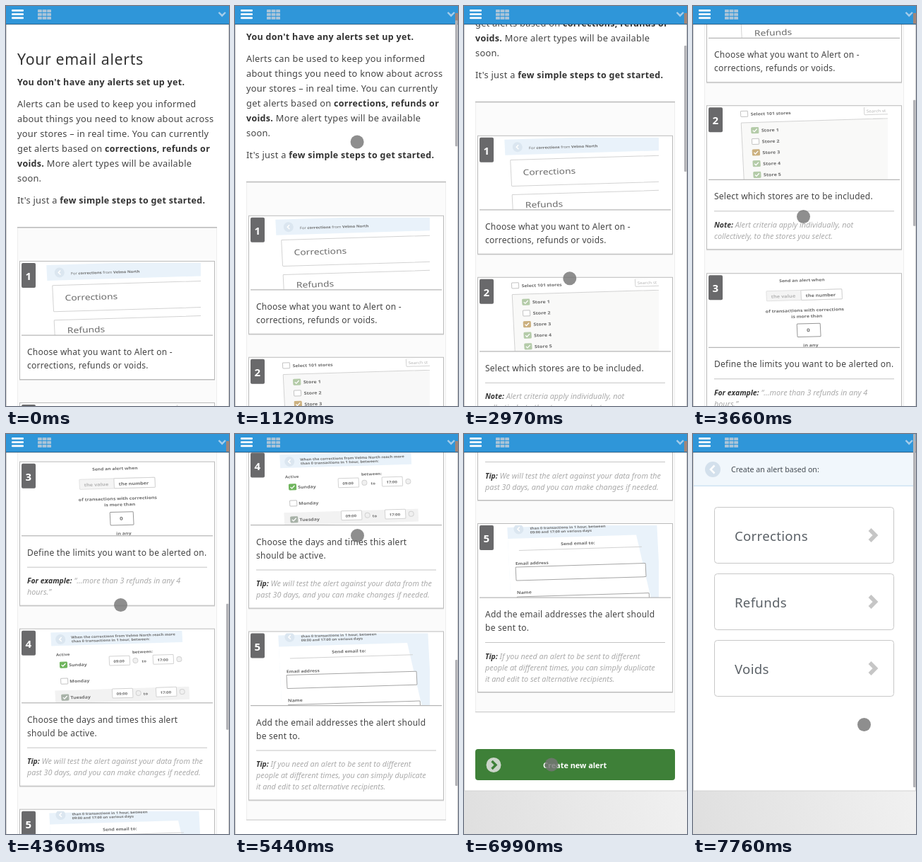
Write an HTML page that moves like this. It is 316 px wide and 565 px high and loops after 8 s.

```html
<!DOCTYPE html>
<html lang="en">
<head>
<meta charset="utf-8">
<title>Email alerts</title>
<style>
html, body { margin: 0; width: 100%; height: 100%; overflow: hidden; background: #eee; }
svg { display: block; width: 100%; height: 100%; }
text { font-family: "Noto Sans", "Open Sans", sans-serif; font-size: 12.8px; letter-spacing: .27px; fill: #444; }
.h1 { font-size: 21.4px; letter-spacing: .6px; fill: #333; }
.b { font-weight: 700; font-size: 12.5px; letter-spacing: .3px; fill: #333; }
.body { font-size: 12px; letter-spacing: .25px; }
.note { font-size: 10.8px; letter-spacing: 0; font-style: italic; fill: #aaa; }
.note .b { font-size: 10.4px; letter-spacing: 0; }
.num { font-size: 15px; font-weight: 600; fill: #fff; text-anchor: middle; }
.button { font-size: 10.9px; letter-spacing: 0; font-weight: 700; fill: #fff; }
.option { font-size: 18.6px; letter-spacing: .3px; fill: #5b6167; }
.sub { font-size: 10.6px; letter-spacing: 0; fill: #444b52; }
.shot { opacity: .87; }
.shot text { letter-spacing: 0; font-weight: 700; fill: #555; }
.shot .plain { font-weight: 400; }
.shot .pale { fill: #aaa; }
.shot .strong { font-weight: 700; }
</style>
</head>
<body>
<svg id="stage" viewBox="0 0 316 565" preserveAspectRatio="none"></svg>
<script>
const text = (x, y, cls, str) => `<text x="${x}" y="${y}" class="${cls}">${str}</text>`;
const rect = (x, y, w, h, fill, extra = '') =>
  `<rect x="${x}" y="${y}" width="${w}" height="${h}" fill="${fill}" ${extra}/>`;
const circle = (x, y, r, fill) => `<circle cx="${x}" cy="${y}" r="${r}" fill="${fill}"/>`;
const path = (d, stroke, width = 1) => `<path d="${d}" fill="none" stroke="${stroke}" stroke-width="${width}"/>`;
const chevron = (x, y, size, stroke, width) =>
  path(`M${x} ${y - Math.abs(size)}l${size} ${Math.abs(size)} ${-size} ${Math.abs(size)}`, stroke, width);
const bold = str => `<tspan class="b">${str}</tspan>`;

// Pieces of the tilted pictures
const box = (x, y, w, h, fill = '#fff', stroke = '#ccc') => rect(x, y, w, h, fill, `rx="1" stroke="${stroke}"`);
const flat = (x, y, size, str, cls = '') =>
  `<text transform="translate(${x} ${y}) scale(1 .82)" class="${cls}" style="font-size:${size}px">${str}</text>`;
const strong = str => `<tspan class="strong">${str}</tspan>`;
const band = (x, w, h) => rect(x, 5, w, h, '#e6f1fa');
const back = (x, y) => circle(x, y, 7, '#d6e3ee') + chevron(x + 1.5, y, -3, '#fff', 1.5);
const tick = (x, y, fill) => box(x - 5, y - 4, 10, 8, fill, fill === '#fff' ? '#bbb' : fill) +
  path(`M${x - 3} ${y}l2 2 4-4`, '#fff', 1.3);
const timeBox = (x, y, time) => box(x, y - 7, 29, 13) + flat(x + 6, y + 2, 6, time) +
  `<circle cx="${x + 37}" cy="${y}" r="3.5" fill="#eee" stroke="#ccc"/>`;

const storeColor = n => n === 2 ? '#fff' : n === 3 ? '#c4a56d' : '#a9c49c';
const storeRow = n => {
  const y = 19.5 + 15.7 * n;
  return tick(29, y, storeColor(n)) + flat(38, y + 2.5, 7.2, 'Store ' + n);
};
const dayRow = (day, i) => {
  const y = 51 + 23 * i, open = day !== 'Monday';
  return (i === 2 ? rect(8, y - 10, 190, 18, '#f0f0f0') : '') +
    tick(22, y, ['#5aaa45', '#fff', '#9ba79b'][i]) + flat(29.5, y + 2.5, 7, day) +
    (open ? timeBox(87 + i, y - 3, '09:00') + flat(133, y, 6, 'to') + timeBox(149 + i, y - 3, '17:00') : '');
};

const shots = [
  band(0, 222, 22) + back(18, 16) +
    flat(34, 19.5, 5.9, `For ${strong('corrections')} from ${strong('Velmo North')}`, 'plain') +
    box(7, 34, 240, 37) + flat(24, 56, 13.8, 'Corrections', 'plain') +
    box(7, 83, 240, 37) + flat(25, 102, 13.8, 'Refunds', 'plain'),

  tick(15, 11.5, '#fff') + flat(24, 14.2, 6.9, 'Select 101 stores') +
    box(185, 7, 60, 11) + flat(188, 15, 6.5, 'Search st', 'pale plain') +
    box(10, 24, 250, 100, '#f8f8f7') + [1, 2, 3, 4, 5].map(storeRow).join(''),

  flat(64.5, 14, 6.7, 'Send an alert when') +
    box(45.5, 26, 107, 14, '#f3f3f3', '#ddd') + box(94.5, 26, 58, 14) +
    flat(52, 36, 7.4, 'the value', 'pale') + flat(101, 36, 7.2, 'the number') +
    flat(43, 56.5, 7, 'of transactions with corrections') + flat(79, 65, 7, 'is more than') +
    box(86.5, 73.5, 33, 18.5, '#fff', '#888') + flat(100, 85, 8, '0') + flat(94, 106, 7, 'in any'),

  band(6, 186, 19) + back(19.5, 15) +
    flat(34.5, 14.2, 5.7, 'When the corrections from Velmo North reach more') +
    flat(35, 19.8, 5.7, 'than 0 transactions in 1 hour, between:') +
    flat(12, 38.4, 6.3, 'Active') + flat(120, 37.8, 6.3, 'between:') +
    ['Sunday', 'Monday', 'Tuesday'].map(dayRow).join(''),

  band(4, 212, 110) + '<path d="M4 21h182l17 94H4z" fill="#fff"/>' + back(20, 8) +
    flat(36, 9, 5.6, 'than 0 transactions in 1 hour, between') +
    flat(36, 14.6, 5.6, '09:00 and 17:00 on various days') +
    flat(78.5, 32.5, 6.9, 'Send email to:') + path('M19 38h174', '#ccc') +
    flat(13, 58.5, 6.8, 'Email address') + box(13, 61.5, 184, 19, '#fff', '#999') +
    flat(13, 99.5, 7, 'Name') + box(13, 103.5, 187, 19, '#fff', '#999')
];

const cards = [
  { lines: ['Choose what you want to Alert on -', 'corrections, refunds or voids.'] },
  { lines: ['Select which stores are to be included.'], label: 'Note:',
    notes: ['Alert criteria apply individually, not', 'collectively, to the stores you select.'] },
  { lines: ['Define the limits you want to be alerted on.'], label: 'For example:',
    notes: ['“…more than 3 refunds in any 4', 'hours.”'] },
  { lines: ['Choose the days and times this alert', 'should be active.'], label: 'Tip:',
    notes: ['We will test the alert against your data from the', 'past 30 days, and you can make changes if needed.'] },
  { lines: ['Add the email addresses the alert should', 'be sent to.'], label: 'Tip:',
    notes: ['If you need an alert to be sent to different', 'people at different times, you can simply duplicate',
      'it and edit to set alternative recipients.'] }
];

// Cards stack downwards, each as tall as its text
let cardTop = 361;
function drawCard({ lines, label, notes = [] }, i) {
  const rule = 129 + 19 * lines.length;
  const height = rule + (label ? 23 + 16 * notes.length : 0);
  const top = Math.round(cardTop);
  cardTop += height + 33.25;
  return `<g transform="translate(0 ${top})">` +
    rect(19, 1, 277, height, '#ddd') + rect(19.5, -.5, 276, height, '#fff', 'stroke="#bbb"') +
    `<g class="shot" clip-path="url(#shotClip)"><g transform="matrix(1 -.03 .05 1 57 0)">${shots[i]}</g></g>` +
    rect(22, 103.5, 271, 1.2, '#b4b4b4') +
    rect(22, 2, 20, 35, '#69696b', 'rx="2"') + text(32, 26, 'num', i + 1) +
    lines.map((line, n) => text(30, 132 + 19 * n, 'body', line)).join('') +
    (label ? rect(30, rule, 255, 1, '#c4c4c4') : '') +
    notes.map((line, n) => text(30, rule + 23.5 + 16 * n, 'note', (n ? '' : bold(label) + ' ') + line)).join('') +
    '</g>';
}

const intro = [
  'Alerts can be used to keep you informed',
  'about things you need to know about across',
  'your stores – in real time. You can currently',
  'get alerts based on ' + bold('corrections, refunds or'),
  bold('voids.') + ' More alert types will be available',
  'soon.'
];

const sheet = bottom => rect(.5, -20, 315, bottom + 20, '#fff', 'stroke="#d2d2d2"');

const alertsPage = sheet(1666) +
  text(16, 82.5, 'h1', 'Your email alerts') +
  text(16, 112, 'b', "You don't have any alerts set up yet.") +
  intro.map((line, i) => text(16, 143 + 21 * i, '', line)).join('') +
  text(16, 279, '', "It's just a " + bold('few simple steps to get started.')) +
  rect(16.5, 313, 282, 1242, '#fbfbfb', 'stroke="#eee"') +
  rect(16, 312, 283, 1.5, '#bbb') + rect(16, 1554, 283, 1, '#ccc') +
  cards.map(drawCard).join('') +
  rect(16, 1607, 283, 44, '#3e8038', 'rx="4"') + circle(42, 1629.5, 10.5, '#ccd5ca') +
  chevron(39.5, 1629.5, 5.5, '#3e8038', 3.4) + text(112, 1634, 'button', 'Create new alert');

const optionsPage = sheet(504) +
  rect(1, 26, 314, 47, '#f1f7fc') + rect(1, 72.5, 314, 1.5, '#cfe3f3') +
  circle(28, 50, 11, '#d3e0ec') + chevron(30.5, 50, -5.5, '#fff', 2.6) +
  text(54, 54, 'sub', 'Create an alert based on:') +
  ['Corrections', 'Refunds', 'Voids'].map((name, i) => {
    const y = 103 + 94 * i;
    return rect(30.5, y + .5, 254, 79, '#fff', 'rx="4" stroke="#c8c8c8"') +
      text(59, y + 48, 'option', name) + chevron(250.5, y + 40, 8, '#c6c6c6', 5.5);
  }).join('');

let icons = '';
for (let row = 0; row < 3; row++) {
  icons += rect(8, 5 + 5.3 * row, 17, 2.7, '#fff', 'rx="1"');
  for (let col = 0; col < 3; col++) icons += rect(45 + 6.6 * col, 5 + 5 * row, 5.8, 4, '#a9c4d8', 'rx=".6"');
}
const header = rect(0, 0, 316, 25, '#2f96d9') + rect(0, 25, 316, 1, '#25699a') +
  rect(0, 26, 316, 1, '#000', 'opacity=".15"') + icons + path('M301.5 9l4.7 4.7 4.7-4.7', '#a6cdea', 2.4);

document.getElementById('stage').innerHTML = `
  <defs>
    <linearGradient id="ground" gradientUnits="userSpaceOnUse" x1="0" y1="565" x2="316" y2="480">
      <stop stop-color="#dfdfdf"/><stop offset="1" stop-color="#f1f1f1"/>
    </linearGradient>
    <clipPath id="shotClip"><rect x="22" y="2" width="254" height="102"/></clipPath>
  </defs>
  ${rect(0, 0, 316, 565, 'url(#ground)')}
  <g id="alerts">${alertsPage}</g>
  <g id="options">${optionsPage}</g>
  ${header}
  ${rect(312, 10, 4, 15, '#a28678', 'id="edge"')}
  ${rect(312, 0, 3.5, 178, '#b3b3b7', 'id="bar" rx="1"')}
  <circle id="pointer" r="9.5" fill="#757575"/>`;

const progress = (t, from, to) => Math.min(1, Math.max(0, (t - from) / (to - from)));
const ease = p => p * p * (3 - 2 * p);

const swipes = [
  { from: 900, to: 1350, by: 132 },
  { from: 2810, to: 3200, by: 122 },
  { from: 3360, to: 4130, by: 489 },
  { from: 4210, to: 4970, by: 149 },
  { from: 5050, to: 5750, by: 200 },
  { from: 5900, to: 6220, by: 70 }
];
const scrollAt = t => swipes.reduce((sum, { from, to, by }) => sum + by * ease(progress(t, from, to)), 0);

// Stops of the pointer as [time, x, y], with an eased glide between them
const stops = [[70, 216, 528], [570, 204, 295], [1350, 165, 165], [2040, 151.5, 387.5], [2500, 146, 434],
  [3660, 156.5, 297.5], [4360, 162.5, 241.5], [5440, 173.5, 143.5], [6060, 163.5, 218.5], [6990, 124, 467],
  [7760, 242.5, 410.5]];
function pointerAt(t) {
  const i = Math.max(1, stops.findIndex(stop => stop[0] > t));
  const [a, b] = t >= 7760 ? stops.slice(-2) : [stops[i - 1], stops[i]];
  const p = ease(progress(t, a[0], b[0]));
  return [a[1] + (b[1] - a[1]) * p, a[2] + (b[2] - a[2]) * p];
}

const shown = (t, from, to) => t < from ? 0 : 1 - progress(t, to, to + 240);

const set = (id, attrs) => Object.entries(attrs).forEach(([name, value]) =>
  document.getElementById(id).setAttribute(name, value));

function draw(t) {
  const scroll = scrollAt(t), [cx, cy] = pointerAt(t), arrived = t >= 7680;
  set('alerts', { transform: `translate(0 ${-scroll})`, opacity: 1 - progress(t, 7130, 7450) });
  set('options', { opacity: arrived ? progress(t, 7600, 7760) : 0 });
  set('bar', {
    y: arrived ? 0 : scroll * .316,
    height: arrived ? 499 : 178,
    opacity: shown(t, 900, 1570) + shown(t, 2810, 6530) + shown(t, 7680, 8000)
  });
  set('edge', { opacity: t >= 900 ? 1 : 0 });
  set('pointer', { cx, cy, opacity: t >= 70 ? .82 : 0 });
}

const start = performance.now();
function loop() {
  draw((performance.now() - start) % 8000);
  requestAnimationFrame(loop);
}
loop();
</script>
</body>
</html>
```
